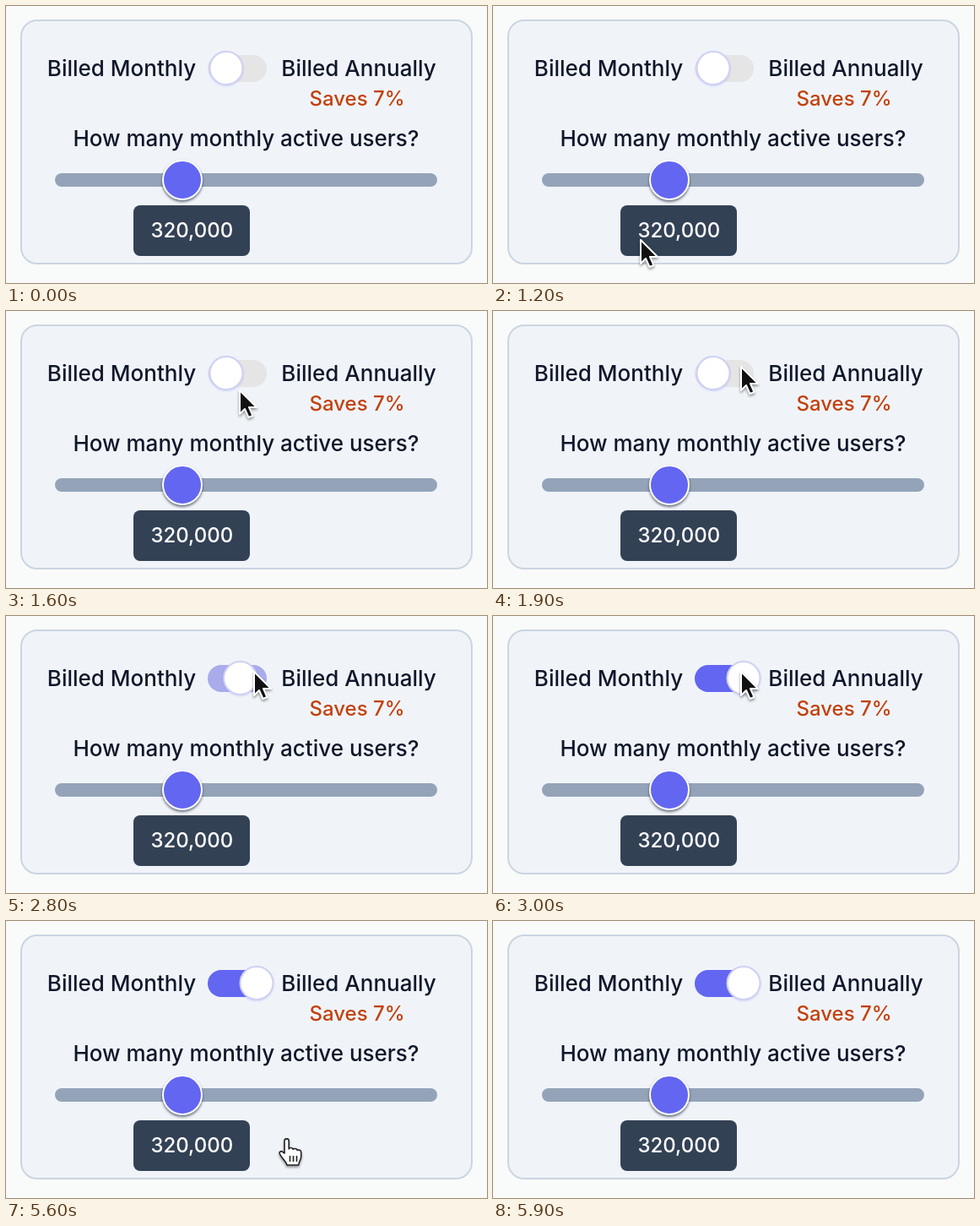
Write an HTML page that moves like this. It is 570 by 328 pixels and loops after 6200 ms.

```html
<!DOCTYPE html>
<html lang="en">
<head>
<meta charset="utf-8">
<title>Billing toggle</title>
<style>
  html, body { margin: 0; width: 100%; height: 100%; overflow: hidden; background: #f9fafa; }
  svg { display: block; width: 100%; height: 100%; }
  text {
    font: 500 26px Inter, sans-serif;
    font-optical-sizing: none;
    text-anchor: middle;
    fill: #0f172a;
  }
  .small { font-size: 24px; }
  #thumb { filter: drop-shadow(0 2px 1.5px rgba(15, 23, 42, .6)); }
  #knob { filter: drop-shadow(0 1px 1px rgba(99, 102, 241, .2)); }
  #arrow, #hand { filter: drop-shadow(0 2px 1.5px rgba(0, 0, 0, .4)); }
</style>
</head>
<body>
<svg viewBox="0 0 570 328">
  <rect x="18" y="17" width="534" height="288" rx="19" fill="#f0f4f9" stroke="#cbd5e1" stroke-width="2"/>

  <text x="137" y="83">Billed Monthly</text>
  <text x="418" y="83">Billed Annually</text>
  <text x="416" y="118" class="small" style="fill:#c2410c">Saves 7%</text>
  <text x="284.5" y="166">How many monthly active users?</text>

  <rect id="track" x="239" y="58" width="70" height="32" rx="16"/>
  <circle id="knob" cy="73.5" r="19.5" fill="#fff" stroke="#cfd0f2" stroke-width="2"/>

  <rect x="58" y="198" width="453" height="16" rx="8" fill="#94a3b8"/>
  <circle id="thumb" cx="209" cy="206" r="23" fill="#6366f1" stroke="#fff" stroke-width="2"/>
  <rect x="151" y="236" width="138" height="60" rx="8" fill="#334155"/>
  <text x="220.3" y="274" class="small" style="fill:#fff">320,000</text>

  <path id="arrow" d="M0 0V28l6-6 4.5 10 5-2-4.5-10h9z"
        fill="#111" stroke="#fff" stroke-width="2" stroke-linejoin="round"/>
  <path id="hand" d="M8 18V3.5a2.6 2.6 0 0 1 5.2 0V13c1-2 4.5-2 5 .5 1-1.6 4.5-1.2 5 1 1.5-1 4.5-.5 4.5 2.5v5c0 4-2.5 5-3 10H11C10 28 5 24 2.5 19c-1.500-3 2-4.500 4-2zM14.500 21v7M18.500 21v7M22.500 21v7"
        fill="#fff" stroke="#222" stroke-width="1.6" stroke-linejoin="round"/>
</svg>
<script>
  const LOOP = 6200, STEP = 100;
  const OFF = [229, 229, 229], ON = [99, 102, 241];

  // Keyframes are [time, ...values].
  const toggleKeys = [[2700, 0], [2800, .46], [2900, .92], [3000, 1]];
  const arrowKeys = [[1200, 175, 277], [1400, 222, 180], [1600, 277, 94], [1800, 293, 68], [1900, 294, 66]];
  const handKeys = [[5600, 322, 257], [5700, 328, 288], [5800, 332, 314]];

  const byId = id => document.getElementById(id);
  const mix = (a, b, p) => a + (b - a) * p;

  function sample(keys, t) {
    if (t <= keys[0][0]) return keys[0].slice(1);
    const i = keys.findIndex(key => key[0] >= t);
    if (i < 0) return keys[keys.length - 1].slice(1);
    const a = keys[i - 1], b = keys[i];
    const p = (t - a[0]) / (b[0] - a[0]);
    return a.slice(1).map((value, k) => mix(value, b[k + 1], p));
  }

  function placeCursor(id, keys, t, start, end) {
    const cursor = byId(id);
    cursor.style.display = t >= start && t < end ? "" : "none";
    cursor.setAttribute("transform", `translate(${sample(keys, t)})`);
  }

  function draw(now) {
    const t = Math.floor(now % LOOP / STEP) * STEP;
    const [on] = sample(toggleKeys, t);
    byId("knob").setAttribute("cx", mix(261, 297, on));
    byId("track").setAttribute("fill", `rgb(${OFF.map((c, i) => Math.round(mix(c, ON[i], on)))})`);
    placeCursor("arrow", arrowKeys, t, 1200, 3900);
    placeCursor("hand", handKeys, t, 5600, 5900);
  }

  const start = performance.now();
  function tick() {
    draw(performance.now() - start);
    requestAnimationFrame(tick);
  }
  tick();
</script>
</body>
</html>
```
